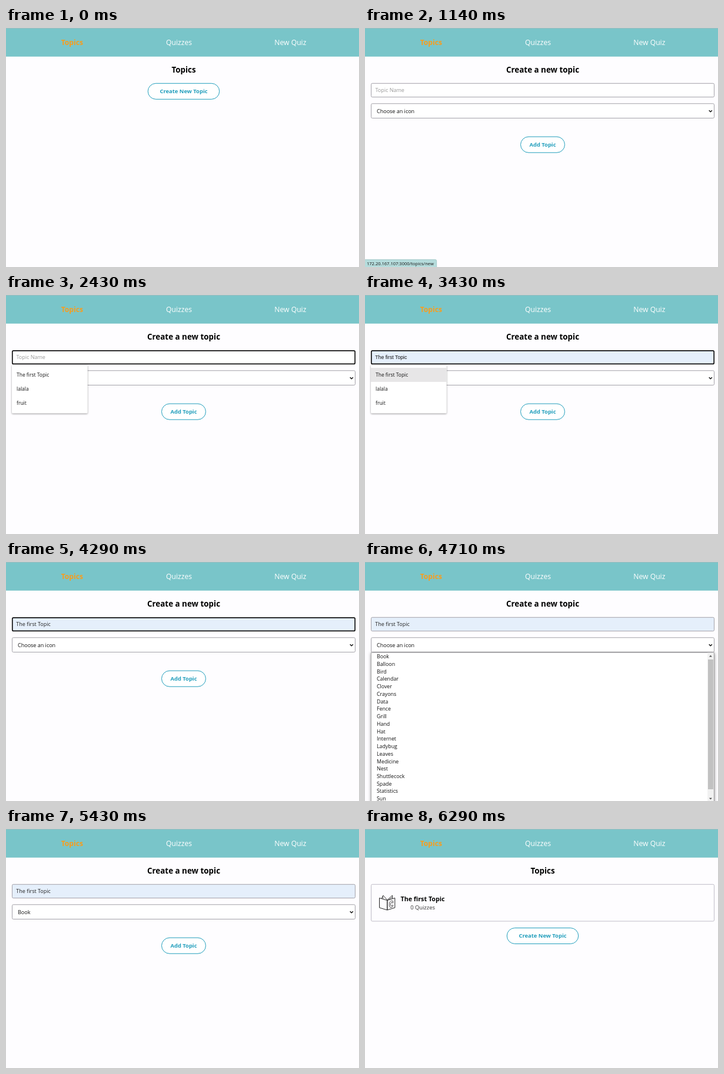
Write an HTML page with a canvas that moves like this. It is 600x407 px and loops after 8000 ms.

```html
<!DOCTYPE html>
<html lang="en">
<head>
<meta charset="utf-8">
<title>Topics</title>
<style>
  html, body { margin: 0; width: 100%; height: 100%; overflow: hidden; background: #fefdff; }
  canvas { display: block; width: 100%; height: 100%; }
</style>
</head>
<body>
<canvas id="stage" width="600" height="407"></canvas>
<script>
const ctx = document.getElementById('stage').getContext('2d');
const LOOP = 8000;
const PAGE = '#fefdff', TEAL = '#79c5c9', BLUE = '#219ebc', INK = '#000';
const OPEN = '"Open Sans", sans-serif', NOTO = '"Noto Sans", sans-serif';
const ARIAL = '"Liberation Sans", Arial, sans-serif';
const TOPIC = 'The first Topic';
const SUGGESTIONS = [TOPIC, 'lalala', 'fruit'];
const ICONS = ['Book', 'Balloon', 'Bird', 'Calendar', 'Clover', 'Crayons', 'Data',
  'Fence', 'Grill', 'Hand', 'Hat', 'Internet', 'Ladybug', 'Leaves', 'Medicine',
  'Nest', 'Shuttlecock', 'Spade', 'Statistics', 'Sun'];

// y is the middle of the capital letters
function text(str, x, y, size, color = INK, { bold = false, align = 'left', family = OPEN } = {}) {
  ctx.font = `${bold ? 'bold ' : ''}${size}px ${family}`;
  ctx.textAlign = align;
  ctx.fillStyle = color;
  ctx.fillText(str, x, y + size * 0.357);
}

function rect(x, y, w, h, color) {
  ctx.fillStyle = color;
  ctx.fillRect(x, y, w, h);
}

function box(x, y, w, h, r, fill, stroke, line = 1) {
  ctx.beginPath();
  ctx.roundRect(x, y, w, h, r);
  ctx.fillStyle = fill;
  ctx.fill();
  if (!stroke) return;
  ctx.strokeStyle = stroke;
  ctx.lineWidth = line;
  ctx.stroke();
}

function path(points, color, line, close) {
  ctx.beginPath();
  points.forEach(([x, y]) => ctx.lineTo(x, y));
  if (close) ctx.closePath();
  ctx.strokeStyle = color;
  ctx.lineWidth = line;
  ctx.stroke();
}

function triangle(x, y, dir) {
  ctx.beginPath();
  ctx.moveTo(x - 2.5, y - dir * 1.3);
  ctx.lineTo(x + 2.5, y - dir * 1.3);
  ctx.lineTo(x, y + dir * 1.5);
  ctx.fillStyle = '#505050';
  ctx.fill();
}

function layer(alpha, draw) {
  if (alpha <= 0) return;
  ctx.save();
  ctx.globalAlpha = alpha;
  draw();
  ctx.restore();
}

function shadow(blur, y, color) {
  ctx.shadowBlur = blur;
  ctx.shadowOffsetY = y;
  ctx.shadowColor = color;
}

function noShadow() {
  ctx.shadowColor = 'transparent';
}

function nav() {
  rect(0, 0, 600, 407, PAGE);
  rect(0, 0, 600, 48.7, TEAL);
  rect(0, 0, 600, 1, '#9bbcbe');
  text('Topics', 112.3, 25, 12.1, '#f99d1c', { bold: true, align: 'center' });
  text('Quizzes', 294, 25, 12.2, '#fff', { align: 'center' });
  text('New Quiz', 483.3, 25, 12.2, '#fff', { align: 'center' });
}

function title(str) {
  text(str, 302, 71.5, 13.4, INK, { bold: true, align: 'center' });
}

function button(label, y, w) {
  box(302 - w / 2, y, w, 27, 13.5, '#fff', BLUE);
  text(label, 302, y + 13.6, 9.42, BLUE, { bold: true, align: 'center' });
}

function book() {
  const c = '#222';
  path([[24.5, 117.5], [37.8, 121.5], [37.8, 138], [24.5, 134]], c, 1, true);
  path([[37.8, 121.5], [50.8, 117.5], [50.8, 134], [37.8, 138]], c, 1, true);
  path([[28, 118.5], [30.8, 113], [37.8, 121]], c, 0.9);
  path([[30.5, 115], [30.5, 118.8]], c, 0.8);
  path([[37.8, 121], [46.5, 113], [46.5, 118.5]], c, 0.9);
  path([[40, 120.5], [46.5, 116]], c, 0.8);
  path([[47.8, 125.5], [47.6, 122.8], [44.5, 122.3], [41.4, 125], [41.2, 131],
    [43, 133.8], [46.3, 133], [48, 130], [46, 129.8], [44.2, 131.2], [43.4, 129.5],
    [43.6, 126.3], [45.2, 124.8], [46, 126]], c, 0.8, true);
}

function topicsPage(saved, icon) {
  title('Topics');
  if (saved) {
    box(10.5, 94.3, 583, 62.7, 2, PAGE, '#bfbcc7');
    if (icon) book();
    text(TOPIC, 98, 119, 10.72, INK, { bold: true, align: 'center' });
    text('0 Quizzes', 98, 133.2, 9.4, '#333', { align: 'center' });
  }
  button('Create New Topic', saved ? 168.5 : 94.3, 121.5);
}

function status(alpha) {
  layer(alpha, () => {
    box(-2, 394.3, 123.7, 16, 2.5, '#b5dcdc', '#9cc3c5', 0.8);
    text('172.20.167.107:3000/topics/new', 3, 401.7, 7.52, '#222', { family: NOTO });
  });
}

function suggestions(alpha, chosen) {
  layer(alpha, () => {
    shadow(3, 1, 'rgba(0,0,0,.4)');
    box(10, 119, 128.7, 82.5, 1.5, '#fff');
    noShadow();
    if (chosen) rect(10, 124, 128.7, 24, '#e7e6e7');
    SUGGESTIONS.forEach((s, i) => text(s, 18, 136.2 + i * 24, 8.45, '#222', { family: NOTO }));
  });
}

function iconList(alpha, chosen) {
  layer(alpha, () => {
    shadow(5, 1, 'rgba(0,0,0,.45)');
    rect(10, 154, 583.5, 260, '#888');
    noShadow();
    rect(10.7, 154.5, 582, 260, '#fff');
    if (chosen) rect(10.7, 154.3, 571.5, 13.2, '#1e90ff');
    ICONS.forEach((name, i) => {
      text(name, 20, 161 + i * 12.74, 8.8, chosen && i === 0 ? '#fff' : '#111');
    });
    rect(582.2, 154.5, 10.3, 253, '#f1f1f1');
    rect(583, 166, 9, 221, '#c1c1c1');
    triangle(587.4, 160.3, -1);
    triangle(587.4, 403, 1);
  });
}

function formPage(s) {
  title('Create a new topic');
  const fill = s.filled ? '#e5effb' : '#fff';
  if (s.focus) box(10.8, 94.8, 582.4, 22.6, 2, fill, '#111', 1.7);
  else box(10.5, 94.3, 583, 23.3, 2, fill, '#a3a1a8');
  if (s.preview) text(TOPIC, 17.3, 106.2, 8.7, '#111', { family: ARIAL });
  else if (s.filled) text(TOPIC, 17.3, 106.2, 9, '#222');
  else text('Topic Name', 17.5, 106.2, 9, '#999');
  if (s.caret) rect(17, 100.5, 0.8, 11.5, INK);

  box(10.5, 128.8, 583, 24.7, 2, '#fff', '#a3a1a8');
  text(s.picked ? 'Book' : 'Choose an icon', 20, 141.7, 9, '#111');
  path([[584.7, 140.2], [587.3, 142.8], [589.9, 140.2]], '#111', 1.5);
  button('Add Topic', 185.2, 75);
  suggestions(s.suggest, s.preview);
  iconList(s.list, s.hover);
}

// value of the last [time, value] step already reached
function step(t, ...steps) {
  let value = 0;
  for (const [at, v] of steps) if (t >= at) value = v;
  return value;
}

function draw(t) {
  nav();
  if (t < 1140) topicsPage(false, false);
  else if (t >= 6000) topicsPage(true, t >= 6290);
  else formPage({
    focus: t >= 1570 && t < 4570,
    caret: t >= 1570 && t < 2430,
    preview: t >= 2570 && t < 3710,
    filled: t >= 2570,
    suggest: step(t, [1720, 0.6], [1860, 1], [3860, 0.65], [4000, 0.3], [4140, 0.1], [4290, 0]),
    list: step(t, [4570, 0.7], [4710, 1], [5140, 0.6], [5290, 0.2], [5430, 0]),
    hover: t >= 5000,
    picked: t >= 5140
  });
  status(step(t, [860, 0.6], [1000, 1], [1290, 0.6], [1430, 0]));
}

const start = performance.now();
function tick() {
  draw((performance.now() - start) % LOOP);
  requestAnimationFrame(tick);
}
tick();
</script>
</body>
</html>
```
